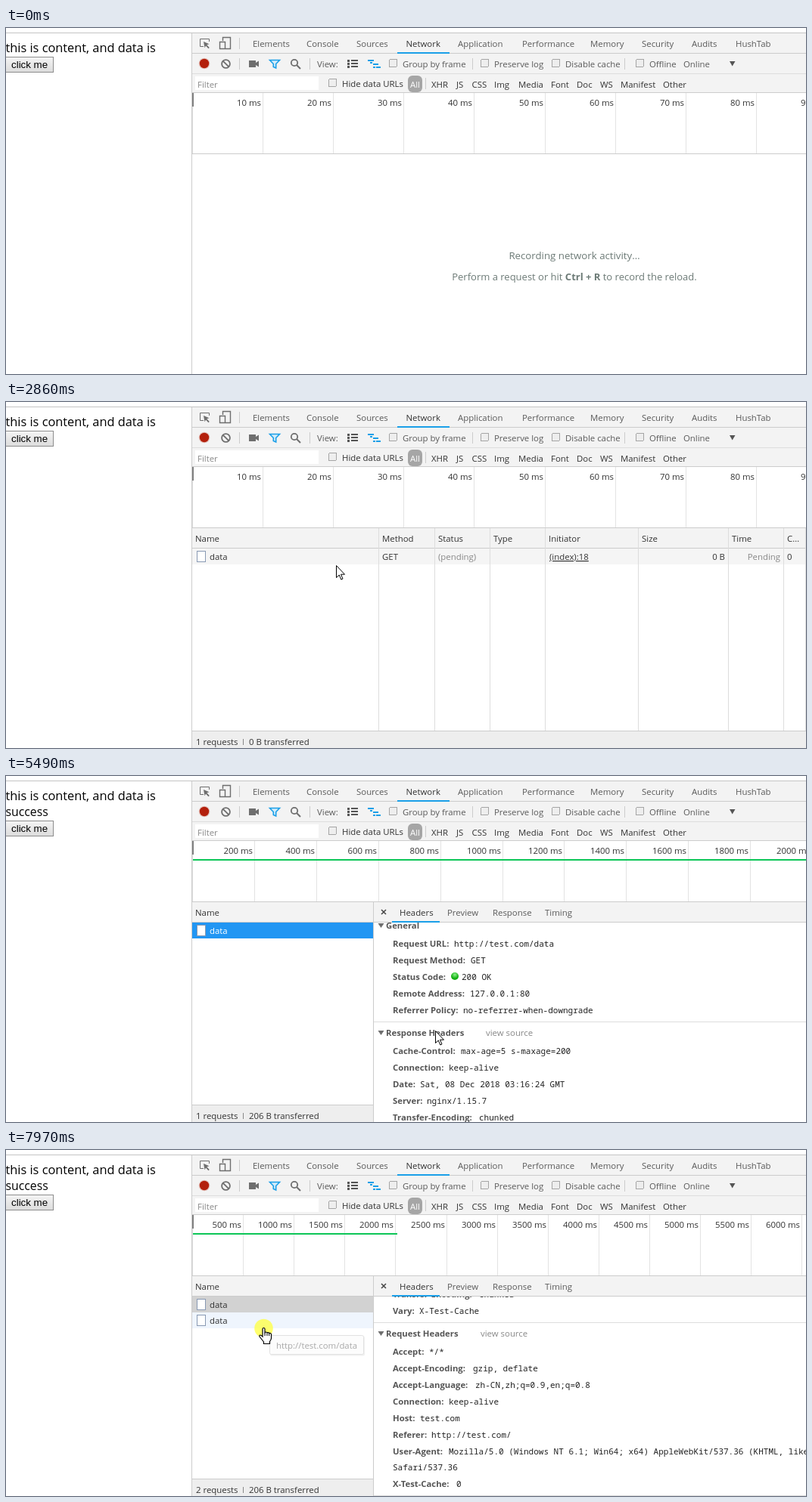
Write an HTML page that moves like this. It is 1057 px wide and 458 px high and loops after 8 s.

```html
<!DOCTYPE html>
<html lang="en">
<head>
<meta charset="utf-8">
<title>Network panel</title>
<style>
  html, body { margin: 0; width: 100%; height: 100%; overflow: hidden; background: #fff; }
  svg { display: block; font-family: "Open Sans", "Noto Sans", sans-serif; }
  text { white-space: pre; }
  rect { shape-rendering: crispEdges; }
</style>
</head>
<body>
<svg id="stage" width="1057" height="458" viewBox="0 0 1057 458"></svg>
<script>
const LOOP = 8000;
const LINE = '#ccc', BAR = '#f3f3f3', BLUE = '#1a9fe8', ICON = '#6e6e6e';
const MONO = "'Noto Sans Mono', 'DejaVu Sans Mono', monospace";

const rect = (x, y, w, h, fill, more = '') =>
  `<rect x="${x}" y="${y}" width="${w}" height="${h}" fill="${fill}" ${more}/>`;
const text = (x, y, str, fill = '#333', more = '', size = 11.4) =>
  `<text x="${x}" y="${y}" font-size="${size}" fill="${fill}" ${more}>${str}</text>`;
const path = (d, stroke, width = 1, fill = 'none') =>
  `<path d="${d}" stroke="${stroke}" stroke-width="${width}" fill="${fill}"/>`;
const group = (id, body, more = '') => `<g id="${id}" ${more}>${body}</g>`;
const words = (y, fill, list) => list.map(([x, s]) => text(x, y, s, fill)).join('');
const END = 'text-anchor="end"', MID = 'text-anchor="middle"', BOLD = 'font-weight="700"';

function page() {
  return text(-0.5, 32, 'this is content, and data is', '#000', '', 16.35) +
    group('success', text(-0.5, 53, 'success', '#000', '', 15.8)) +
    group('button',
      '<rect x="-1.5" y="38.5" width="64" height="20" fill="url(#face)" stroke="#8d8d8d"/>' +
      text(7, 53, 'click me', '#000', 'font-family="Liberation Sans, Arial, sans-serif"', 13.33));
}

function toolbar() {
  const checkbox = (x, y) =>
    `<rect x="${x + .5}" y="${y + .5}" width="10" height="10" rx="1.5" fill="#eee" stroke="#a5a5a5"/>`;
  const divider = (x, y) => rect(x, y, 1, 15, LINE);
  return rect(246, 7, 811, 79, BAR) + rect(0, 6, 1057, 1, '#c4c4c4') + rect(245, 7, 1, 451, LINE) +
    rect(246, 33, 811, 1, LINE) + rect(246, 60, 811, 1, '#ddd') + rect(246, 85, 811, 1, LINE) +
    rect(517, 32, 69, 2, BLUE) +
    path('M261 24.5H256.5V14.5H268.5V18', ICON) +
    path('M261 18L268.5 21.2 265.3 22.3 268.8 26 267.4 27.2 264 23.6 262.5 26.3Z', 'none', 0, ICON) +
    path('M286.5 17V12.5H296.5V27.5H290M282.5 18.5H289.5V27.5H282.5Z', ICON, 1.4) +
    divider(308, 13) +
    words(25, '#5a5a5a', [[326, 'Elements'], [397, 'Console'], [463, 'Sources'], [597, 'Application'],
      [682, 'Performance'], [772, 'Memory'], [840, 'Security'], [906, 'Audits'], [964, 'HushTab']]) +
    text(528.5, 25, 'Network', '#333') +
    '<circle cx="262" cy="47" r="7.3" fill="#e2bfb9"/><circle cx="262" cy="47" r="6.2" fill="#b3200c"/>' +
    '<circle cx="290.5" cy="47.5" r="5.4" fill="none" stroke="#6e6e6e" stroke-width="1.8"/>' +
    path('M286.8 43.8L294.2 51.2', ICON, 1.8) +
    divider(308, 40) +
    path('M321 43H330V46L334 43.5V51.5L330 49V52H321Z', 'none', 0, ICON) +
    path('M348.5 42.5H361.5L356.7 47.5V53L353.3 51.5V47.5Z', BLUE, 1.6, '#d3ecfa') +
    '<circle cx="381" cy="46" r="4.2" fill="none" stroke="#6e6e6e" stroke-width="1.8"/>' +
    path('M384 49L389 54', ICON, 2) +
    divider(401, 40) +
    [42, 46, 50].map(y => rect(451, y, 3, 3, '#555') + rect(456, y, 9, 2, '#555')).join('') +
    rect(478, 42, 8, 2, BLUE) + rect(481, 45, 3, 2, BLUE) + rect(485, 47, 7, 2, BLUE) +
    rect(485, 51, 3, 2, BLUE) + rect(489, 51, 6, 2, BLUE) +
    [506, 627, 721, 832].map(x => checkbox(x, 41)).join('') + divider(616, 40) + divider(817, 40) +
    words(52, '#5a5a5a', [[411, 'View:'], [524, 'Group by frame'], [645, 'Preserve log'],
      [739, 'Disable cache'], [850, 'Offline'], [895, 'Online']]) +
    path('M956 44H963.5L959.7 50.5Z', 'none', 0, '#555') +
    rect(250, 64, 163, 18, '#fff') + text(253, 79, 'Filter', '#888') + checkbox(426, 67) +
    '<rect x="531" y="63" width="19" height="22" rx="6" fill="#a6a6a6" style="shape-rendering:auto"/>' +
    text(540.5, 79, 'All', '#fff', MID) + divider(554, 66) + text(444, 78, 'Hide data URLs') +
    words(79, '#333', [[562, 'XHR'], [595, 'JS'], [615.5, 'CSS'], [645, 'Img'], [677, 'Media'],
      [720, 'Font'], [754, 'Doc'], [785, 'WS'], [812, 'Manifest'], [868, 'Other']]);
}

function ruler(id, gap, unit, barEnd) {
  let out = '';
  for (let i = 1; 246 + gap * (i - 1) < 1057; i++) {
    const x = Math.round(246 + gap * i);
    out += rect(x, 86, 1, 80, '#e3e3e3') + text(x - 2, 103, `${unit * i} ms`, '#333', END);
  }
  if (barEnd) out += rect(247, 110, barEnd - 247, 2, '#0cc657');
  return group(id, out);
}

const hint = () => group('hint',
  text(751, 306, 'Recording network activity…', '#6c7a76', MID, 13.25) +
  text(751, 334, `Perform a request or hit <tspan ${BOLD}>Ctrl + R</tspan> to record the reload.`,
    '#6c7a76', MID, 13));

const fileRow = (id, y, name) =>
  group(id, `<rect class="back" x="246" y="${y}" width="811" height="21"/>` +
    `<rect x="252.5" y="${y + 3.5}" width="11" height="14" rx="1" fill="#fff" stroke="#8899b3"/>` +
    text(269, y + 15, name, '#333', 'class="name"'));

function table() {
  const columns = [492, 566, 639, 712, 835, 954, 1027, 1056];
  const cells = (id, status, type, size, time, end, gray) => group(id,
    text(571, 209, status, gray) + text(644, 209, type) + text(950, 209, size, '#333', END) +
    text(1023, 209, time, gray, END) + text(1032, 209, end));
  return group('list', rect(246, 167, 811, 26, BAR) + rect(246, 193, 811, 1, LINE) +
    text(250, 185, 'Name') + fileRow('row1', 194, 'data') + fileRow('row2', 215, 'data') +
    group('columns', columns.map(x => rect(x, 167, 1, 268, '#ddd')).join('') +
      words(185, '#333', [[497, 'Method'], [571, 'Status'], [644, 'Type'], [717, 'Initiator'],
        [840, 'Size'], [959, 'Time'], [1032, 'C…']]) +
      text(497, 209, 'GET') + text(718, 209, '(index):18', '#333', 'text-decoration="underline"') +
      cells('pending', '(pending)', '', '0 B', 'Pending', '0', '#888') +
      cells('done', '200', 'fetch', '206 B', '2.01 s', '3…', '#333')) +
    rect(246, 435, 811, 1, LINE) + rect(246, 436, 811, 22, '#eee') +
    text(251, 454, '1 requests', '#333', 'id="count"') + rect(313, 446, 1, 8, '#888') +
    text(321, 454, '0 B transferred', '#333', 'id="bytes"'));
}

function section(title, y, linkX, items) {
  let out = path(`M491.5 ${y - 7}H499.5L495.5 ${y - 1}Z`, 'none', 0, ICON) +
    text(502, y, title, '#555', BOLD, 11.3);
  if (linkX) out += text(linkX, y, 'view source', '#888');
  items.forEach(([label, x, value], i) => {
    const base = y + 24 + 22 * i;
    out += text(511, base, label + ':', '#555', BOLD, 11.3) +
      text(x, base, value, '#222', `font-family="${MONO}"`, 11);
  });
  return out;
}

function details() {
  const agent = 'Mozilla/5.0 (Windows NT 6.1; Win64; x64) AppleWebKit/537.36 (KHTML, like Gecko)';
  const body =
    section('General', 214, 0, [
      ['Request URL', 592, 'http://test.com/data'], ['Request Method', 614, 'GET'],
      ['Status Code', 602, '200 OK'], ['Remote Address', 613, '127.0.0.1:80'],
      ['Referrer Policy', 604, 'no-referrer-when-downgrade']]) +
    '<circle cx="593" cy="277" r="5" fill="url(#lamp)"/>' + rect(486, 337, 571, 1, '#ddd') +
    section('Response Headers', 356, 634, [
      ['Cache-Control', 601, 'max-age=5 s-maxage=200'], ['Connection', 585, 'keep-alive'],
      ['Date', 547, 'Sat, 08 Dec 2018 03:16:24 GMT'], ['Server', 556, 'nginx/1.15.7'],
      ['Transfer-Encoding', 625, 'chunked'], ['Vary', 546, 'X-Test-Cache']]) +
    rect(486, 501, 571, 1, '#ddd') +
    section('Request Headers', 520, 627, [
      ['Accept', 559, '*/*'], ['Accept-Encoding', 617, 'gzip, deflate'],
      ['Accept-Language', 620, 'zh-CN,zh;q=0.9,en;q=0.8'], ['Connection', 585, 'keep-alive'],
      ['Host', 547, 'test.com'], ['Referer', 562, 'http://test.com/'], ['User-Agent', 585, agent]]) +
    text(511, 697, '', '#222', `id="agentEnd" font-family="${MONO}"`, 11) +
    text(511, 719, 'X-Test-Cache:', '#555', BOLD, 11.3) +
    text(595, 719, '0', '#222', `font-family="${MONO}"`, 11) + rect(486, 730, 571, 1, '#ddd');
  return group('details', rect(485, 167, 572, 291, '#fff') +
    group('', group('scroller', body), 'clip-path="url(#pane)"') +
    rect(486, 167, 571, 26, BAR) + rect(486, 193, 571, 1, LINE) + rect(485, 167, 1, 291, LINE) +
    rect(510, 192, 63, 2, BLUE) + path('M496 177L502 183M502 177L496 183', '#444', 1.5) +
    text(520, 185, 'Headers') +
    words(185, '#5a5a5a', [[583, 'Preview'], [643, 'Response'], [712, 'Timing']]));
}

const tooltip = () => group('tip',
  '<rect x="1" y="1.5" width="125" height="26" rx="2" fill="#000" opacity=".12" style="shape-rendering:auto"/>' +
  '<rect x=".5" y=".5" width="124" height="25" rx="2" fill="#fafafa" stroke="#c4c4c4" style="shape-rendering:auto"/>' +
  text(9, 18, 'http://test.com/data', '#555'));

const pointer = () => group('pointer',
  '<circle id="halo" cx=".5" cy="1" r="12.3" fill="#ffff3c" opacity=".75"/>' +
  group('arrow', path('M.5 .5V16.5L4.3 13 6.8 19 9 18 6.5 12.2H11.5Z', '#000', 1, '#fff')) +
  group('hand', path('M5 2Q5 .5 6.5 .5T8 2V7.5Q8 6 9.5 6T11 7.5Q11.2 6.5 12.4 6.7T13.7 8Q14 7.2 15 7.4' +
    'T16.5 9V14Q16.5 16 14.5 18.5V21.5H6.5V19Q4.5 16.5 1 12Q.3 10.3 2 10Q3 10 5 12Z', '#000', 1.2, '#fff') +
    path('M8 7V11M11 7.5V11M13.7 8V11', '#000'), 'transform="translate(-6 0)"'));

document.getElementById('stage').innerHTML =
  `<defs><linearGradient id="face" x2="0" y2="1"><stop stop-color="#f4f4f4"/>
   <stop offset="1" stop-color="#dcdcdc"/></linearGradient>
   <radialGradient id="lamp" cy=".3"><stop stop-color="#8df08a"/><stop offset="1" stop-color="#12b012"/></radialGradient>
   <clipPath id="pane"><rect x="486" y="194" width="571" height="264"/></clipPath></defs>` +
  rect(0, 0, 1057, 458, '#fff') + page() + toolbar() +
  ruler('idleRuler', 93.12, 10) + ruler('doneRuler', 81.9, 200, 1057) + ruler('longRuler', 67.1, 500, 517) +
  rect(246, 86, 1, 80, '#ddd') + rect(246, 86, 2, 18, '#808080') + rect(246, 166, 811, 1, LINE) +
  hint() + table() + details() + tooltip() + pointer();

const $ = Object.fromEntries([...document.querySelectorAll('[id]')].map(el => [el.id, el]));
const show = (el, on) => { el.style.display = on ? '' : 'none'; };
const within = (t, spans) => spans.some(([a, b]) => t >= a && t < b);

// Bursts of screen updates: start, end, number of steps
const BURSTS = [[0, 0, 1], [70, 780, 10], [930, 930, 1], [1160, 1390, 4], [1560, 2320, 11],
  [2400, 2480, 2], [2700, 3250, 8], [3400, 4170, 11], [4230, 4320, 2], [4550, 5340, 11],
  [5410, 6100, 10], [6250, 7040, 11], [7180, 7970, 11]];
// Pointer path: time, x, y
const PATH = [[70, 764, 388], [300, 480, 250], [550, 150, 105], [780, 44, 42], [930, 44, 42],
  [1160, 48, 62], [1390, 76, 175], [1560, 84, 177], [1900, 353, 212], [2100, 353, 212],
  [2320, 552, 213], [2400, 536, 213], [2480, 535, 213], [2700, 520, 213], [3250, 226, 225],
  [3400, 216, 214], [3950, 46, 79], [4090, 46, 79], [4170, 43, 76], [4320, 42, 74],
  [4550, 50, 80], [4940, 291, 199], [5110, 291, 199], [5400, 560, 320], [5800, 590, 400],
  [6000, 589, 441], [6100, 589, 441], [6250, 580, 434], [6950, 46, 72], [7040, 45, 71],
  [7180, 48, 76], [7800, 335, 229], [7880, 340, 235], [8000, 340, 235]];
const PRESSES = [[780, 930], [4940, 5020], [6015, 6095], [7035, 7180], [7965, 8000]];
// Tooltips: start, end, x, y
const TIPS = [[1940, 2160, 362, 224], [2330, 2700, 545, 224], [7870, 8000, 348, 245]];
const SENT = 930, ANSWERED = 2930, OPENED = 5020, BLURRED = 6015, RESENT = 7180;

function settle(t) {
  const [start, end, steps] = BURSTS.filter(b => b[0] <= t).pop();
  if (steps === 1) return start;
  const gap = (end - start) / (steps - 1);
  return start + gap * Math.min(steps - 1, Math.floor((t - start + 10) / gap));
}

function pointerAt(t) {
  const i = Math.max(1, PATH.findIndex(p => p[0] >= t));
  const [t0, x0, y0] = PATH[i - 1], [t1, x1, y1] = PATH[i];
  const k = Math.max(0, (t - t0) / (t1 - t0));
  return [x0 + (x1 - x0) * k, y0 + (y1 - y0) * k].map(Math.round);
}

function render(clock) {
  const t = settle(clock);
  const sent = t >= SENT, answered = t >= ANSWERED, opened = t >= OPENED, resent = t >= RESENT;
  const [x, y] = pointerAt(t);
  const overList = sent && x >= 246 && x < (opened ? 485 : 1057);
  const hover1 = overList && y >= 194 && y < 215;
  const hover2 = resent && overList && y >= 215 && y < 236;
  const focused = opened && t < BLURRED;

  show($.success, answered);
  $.button.setAttribute('transform', `translate(0 ${answered ? 21 : 0})`);
  show($.idleRuler, !answered);
  show($.doneRuler, answered && !resent);
  show($.longRuler, resent);
  show($.hint, !sent);
  show($.list, sent);
  show($.columns, !opened);
  show($.pending, !answered);
  show($.done, answered);
  show($.row2, resent);
  $.row1.querySelector('.back').setAttribute('fill',
    focused ? '#2196f3' : opened ? '#d2d2d2' : hover1 ? '#ebf2fc' : '#f5f5f5');
  $.row1.querySelector('.name').setAttribute('fill', focused ? '#fff' : '#333');
  $.row2.querySelector('.back').setAttribute('fill', hover2 ? '#eff5fd' : '#fff');
  $.count.textContent = `${resent ? 2 : 1} requests`;
  $.bytes.textContent = `${answered ? 206 : 0} B transferred`;

  show($.details, opened);
  const scroll = 273 * Math.min(1, Math.max(0, (t - 5470) / 380));
  $.scroller.setAttribute('transform', `translate(0 ${-Math.round(scroll)})`);
  $.agentEnd.textContent = `${resent ? '' : '0 '}Safari/537.36`;

  const tip = TIPS.find(p => within(t, [p]));
  show($.tip, tip);
  if (tip) {
    $.tip.setAttribute('transform', `translate(${tip[2]} ${tip[3]})`);
    $.tip.setAttribute('opacity', Math.min(1, (t - tip[0]) / 200));
  }
  show($.pointer, t >= 70);
  show($.hand, hover1 || hover2);
  show($.arrow, !hover1 && !hover2);
  show($.halo, within(t, PRESSES));
  $.pointer.setAttribute('transform', `translate(${x} ${y})`);
}

const began = performance.now();
function tick() {
  render((performance.now() - began) % LOOP);
  requestAnimationFrame(tick);
}
tick();
</script>
</body>
</html>
```
